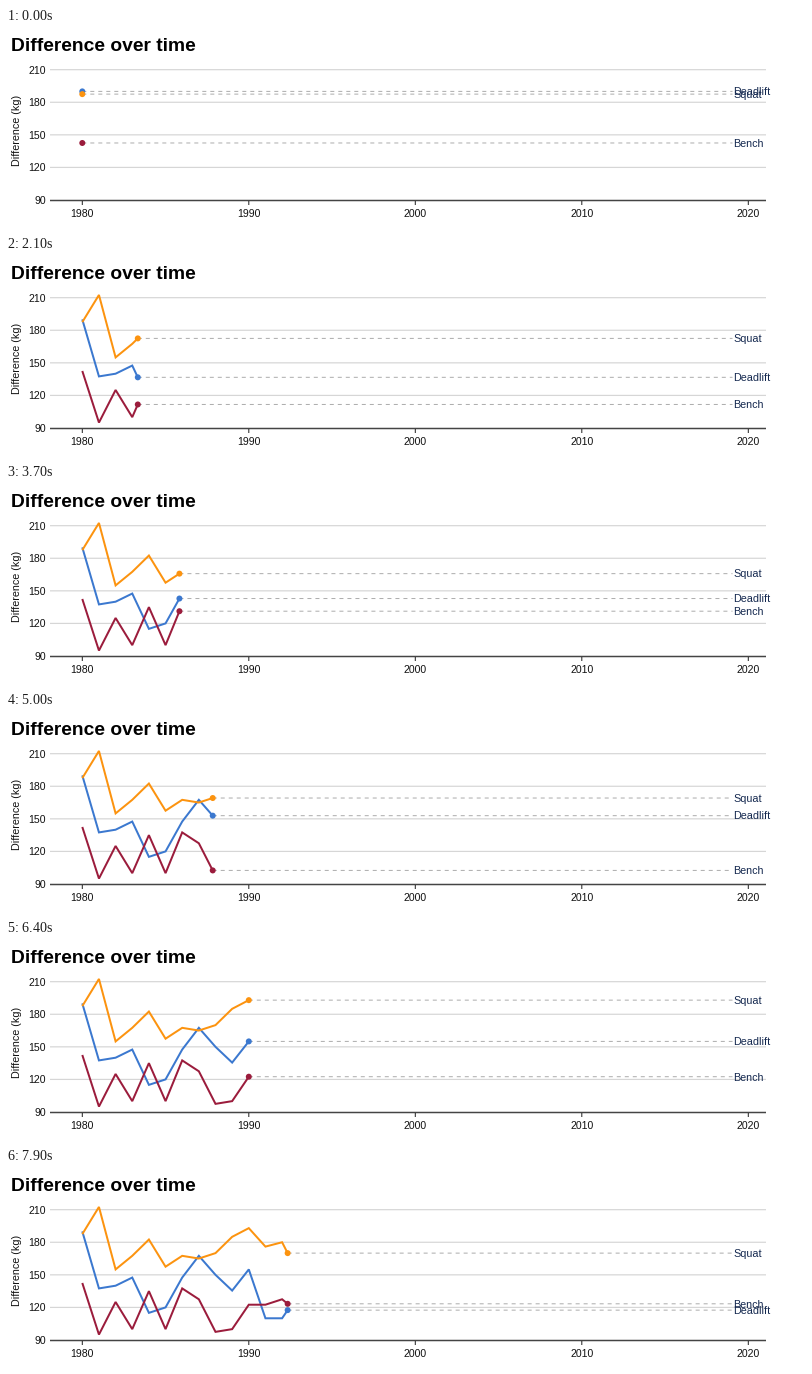
A matplotlib script that plays this animation: 800x200 px, repeating every 8000 ms.

```python
import numpy as np
import matplotlib.pyplot as plt
from matplotlib.animation import FuncAnimation
from matplotlib.patches import Circle

PX = 0.72  # points per pixel at 100 dpi
START = 1980
LEFT, RIGHT, LABEL_X = 44, 760, 727.5
FRAMES, INTERVAL = 80, 100
STEPS = 6  # steps from one year to the next

# name: (colour, corner of the line at each year), in drawing order
SERIES = {
    "Deadlift": ("#3b78cf", [190, 137.5, 140, 147.5, 115, 120, 147.5, 167.5,
                             150, 135.5, 155, 110, 110, 132.5]),
    "Bench": ("#9b1c3c", [142.5, 95, 125, 100, 135, 100, 137.5, 127.5,
                          97.5, 100, 122.5, 122.5, 127.5, 115]),
    "Squat": ("#fc930f", [187.5, 212.5, 155, 167.5, 182.5, 157.5, 167.5, 165,
                          170, 185, 193, 176, 180, 150]),
}

plt.rcParams["font.family"] = "Liberation Sans"


def x_pos(year):
    return 76.3 + 16.65 * np.asarray(year)


def y_pos(value):
    return 172 - 1.086 * (np.asarray(value) - 90)


def timeline():
    """Years elapsed per frame: even steps, with a pause two years in five."""
    for year in range(FRAMES // STEPS):
        if year % 5 in (2, 4):
            yield year
        for step in range(STEPS):
            yield year + step / STEPS


progress = list(timeline())[:FRAMES]

fig = plt.figure(figsize=(8, 2), dpi=100, facecolor="white")
ax = fig.add_axes([0, 0, 1, 1])
ax.set(xlim=(0, 800), ylim=(200, 0))
ax.axis("off")


def text(x, y, s, size=10.5, **kw):
    return ax.text(x, y, s, fontsize=size * PX, **{"color": "#111111", **kw})


def stroke(xs, ys, color, width, **kw):
    return ax.plot(xs, ys, color=color, lw=width * PX, snap=False,
                   solid_capstyle="butt", **kw)[0]


def draw_axes():
    text(5, 23, "Difference over time", 19.25, weight="bold", color="black")
    text(11, 102.5, "Difference (kg)", 10.8, rotation=90,
         ha="center", va="center")
    for value in range(90, 211, 30):
        y = y_pos(value)
        if value > 90:
            stroke([LEFT, RIGHT], [y, y], "#d6d6d6", 1.2, zorder=1)
        text(39.7, y + 3.9, value, ha="right")
    stroke([LEFT, RIGHT], [172.5, 172.5], "#444444", 1.5, zorder=1)
    for year in range(0, 41, 10):
        x = x_pos(year)
        stroke([x, x], [173, 177], "#222222", 1, zorder=1)
        text(x, 189, START + year, ha="center")


class Race:
    def __init__(self, name, color, values, z):
        self.values = np.array(values)
        self.years = np.arange(len(values))
        self.guide = stroke([], [], "#adadad", 1, zorder=2,
                            dashes=(4, 4), dash_capstyle="butt")
        self.line = stroke([], [], color, 2, zorder=z,
                           solid_joinstyle="miter")
        self.dot = ax.add_patch(Circle((0, 0), 3, fc=color, lw=0, zorder=z + 0.5))
        self.label = text(LABEL_X, 0, name, 10.7, color="#14284f", zorder=10)

    def update(self, t):
        past = self.years < t
        xs = x_pos(np.append(self.years[past], t))
        ys = y_pos(np.append(self.values[past],
                             np.interp(t, self.years, self.values)))
        x, y = xs[-1], ys[-1]
        self.line.set_data(xs, ys)
        self.guide.set_data([x, LABEL_X - 1], [y, y])
        self.dot.center = x, y
        self.label.set_y(y + 3.8)


draw_axes()
races = [Race(name, *spec, z=3 + i)
         for i, (name, spec) in enumerate(SERIES.items())]


def update(frame):
    for race in races:
        race.update(progress[frame])


anim = FuncAnimation(fig, update, frames=FRAMES, interval=INTERVAL,
                     repeat=True, repeat_delay=0)
plt.show()
```
